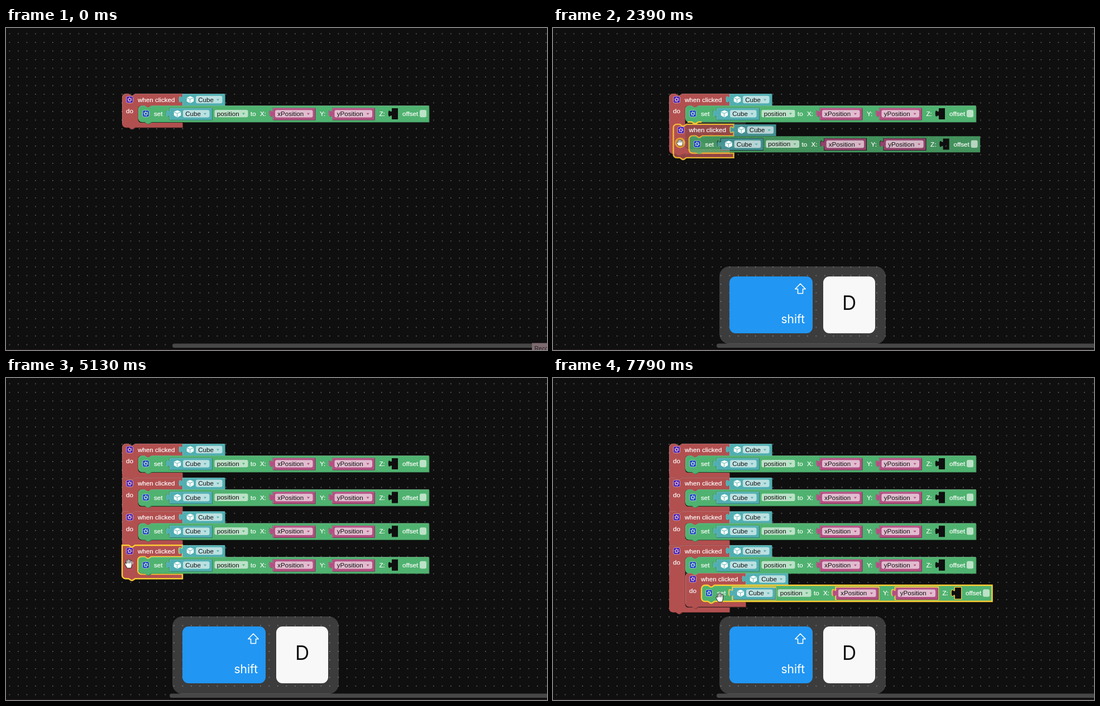
These frames come from a looping animation (969 px wide and 578 px high, 8 s). An HTML page:

```html
<!DOCTYPE html>
<html lang="en">
<head>
<meta charset="utf-8">
<title>Duplicating blocks</title>
<style>
  html, body { margin: 0; width: 100%; height: 100%; overflow: hidden; background: #0f0f0f; }
  svg { display: block; width: 969px; height: 578px; }
  text { font: 11.6px "Liberation Sans", Arial, sans-serif; fill: #fff; }
  .block text { stroke: #fff; stroke-width: .2; }
  .block .field text { fill: #111; stroke: none; }
  .shape { fill: var(--c); fill-rule: evenodd; }
  .shade { fill: color-mix(in srgb, var(--c), #000 32%); }
  .light { fill: none; stroke: color-mix(in srgb, var(--c), #fff 25%); stroke-width: .8; }
  .drag .shape { fill-opacity: .8; stroke-opacity: .85; }
  .drag .shade, .drag .light, .picked > .light { display: none; }
  .picked > .shape { stroke: #fc3; stroke-width: 2.4; }
  .icon { opacity: .62; }
  .hover .event > .icon { opacity: 1; }
  .key text { font-family: Inter, sans-serif; }
</style>
</head>
<body>
<svg id="stage" viewBox="0 0 969 578"></svg>
<script>
const LOOP = 8000;
const RED = '#b25050', GREEN = '#50b270', CYAN = '#50afb2', PINK = '#b25081';
const PITCH = 60.65, MOUTH = 51.7, HOME = [208, 118.3], NEST = [29, 50.4], COPY = [21.5, 43.6];

const NOTCH = 'l4.6,3.1 h2.4 l4.6,-3.1';
const NOTCH_BACK = 'l-4.6,3.1 h-2.4 l-4.6,-3.1';
const TAB = 'c0,7.75 -6.2,-6.2 -6.2,5.8 s6.2,-1.9 6.2,5.8';
const ROUND = 'V6 a6,6 0 0 1 6,-6';
const topEdge = square => `${square ? 'V0' : ROUND} H11.6 ${NOTCH}`;

// Event block outline: grow stretches the mouth, above/below square the joined corners.
function eventPath(grow = 0, above = false, below = false) {
  const inner = MOUTH + grow, end = PITCH - .7 + grow;
  return `M0,9 ${topEdge(above)} H108 v3.9 ${TAB} V20.7 H52 ${NOTCH_BACK} H34.2
    a6,6 0 0 0 -6,6 V${inner - 6} a6,6 0 0 0 6,6 H108 V${end} H23.2 ${NOTCH_BACK}
    ${below ? `H0 V${end}` : 'H6 a6,6 0 0 1 -6,-6'} Z`;
}
const valuePath = (x, y, w, h) => `M${x},${y} v3.9 ${TAB} V${y + h} H${x + w} V${y} Z`;
const bar = `M0,9 ${topEdge()} H520.5 V29 H23.2 ${NOTCH_BACK} H6 a6,6 0 0 1 -6,-6 Z`;
const emptySocket = valuePath(454, 4.2, 11, 20);
const sockets = [56, 241, 347.5].map(x => valuePath(x - .6, 3.4, 77, 22.2)).join(' ') + emptySocket;

const label = (x, y, s) => `<text x="${x}" y="${y}">${s}</text>`;
const faces = (outline, solid, light) =>
  `<path class="shade" transform="translate(.9 .9)" d="${solid}"/>
   <path class="shape" d="${outline}"/><path class="light" d="${light}"/>`;

const gear = (x, y) => `<g class="icon" transform="translate(${x} ${y})" fill="none" stroke="#fff">
  <rect x="-6" y="-6" width="12" height="12" rx="3" fill="#00f" stroke-width=".8"/>
  <circle r="2.4" stroke-width="1.3"/>
  <circle r="3.6" stroke-width="1.4" stroke-dasharray="1.6 2.17"/></g>`;

const pill = (x, y, w) =>
  `<rect x="${x}" y="${y}" width="${w}" height="13.4" rx="3" fill="#fff" fill-opacity=".62"/>`;
const field = (x, y, w, s, color) => `<g class="field">${pill(x, y, w)}${label(x + 4.2, y + 10.9, s)}
  <path d="M${x + w - 10.5},${y + 5.6} h5 l-2.5,3.2 Z" fill="${color}"/></g>`;

const value = (x, y, w, color, content) => `<g transform="translate(${x} ${y})" style="--c:${color}">
  ${faces(valuePath(0, 0, w, 21), valuePath(0, 0, w, 21), `M${w},.4 H.4 V3.9 ${TAB} V21`)}${content}</g>`;
const cube = (x, y) => value(x, y, 76, CYAN, `
  <path d="M14,4 L20.2,6.6 V13.4 L14,16.8 L7.8,13.4 V6.6 Z" fill="#fff"/>
  <path d="M8.2,7.2 L13.6,9.6 L19.8,7.2 M13.6,9.6 V16.2" fill="none" stroke="${CYAN}"/>
  ${field(24, 3.5, 47.5, 'Cube', CYAN)}`);
const variable = (x, name) => value(x, 4, 75.5, PINK, field(4, 3.5, 67.5, name, PINK));

const blockMarkup = `<g class="block">
  <g class="event" style="--c:${RED}">
    ${faces('', '', '')}${gear(13.5, 10.3)}${label(28, 14.4, 'when clicked')}${label(7, 35, 'do')}
  </g>
  ${cube(108, 0)}
  <g class="setter" transform="translate(29 21.4)" style="--c:${GREEN}">
    ${faces(bar + sockets, bar, `M.4,23 ${topEdge()} H520.5`)}
    <path class="shade" d="${emptySocket}" style="fill:#0f0f0f"/>
    ${gear(13.5, 14)}${label(28, 18.4, 'set')}${cube(56, 4)}
    ${field(136.5, 7.2, 60, 'position', GREEN)}${label(201, 18.4, 'to')}
    ${label(218, 18.4, 'X:')}${variable(241, 'xPosition')}
    ${label(325, 18.4, 'Y:')}${variable(347.5, 'yPosition')}
    ${label(431.5, 18.4, 'Z:')}${label(473, 18.4, 'offset')}${pill(504, 7.2, 12)}
  </g></g>`;

const stage = document.getElementById('stage');
stage.innerHTML = `
  <pattern id="dots" x="5.5" y="9.5" width="15.5" height="15.5" patternUnits="userSpaceOnUse">
    <rect width="1.6" height="1.6" fill="#686868"/></pattern>
  <rect width="969" height="578" fill="#0f0f0f"/>
  <rect width="969" height="578" fill="url(#dots)"/>
  <rect y="577" width="969" height="1" fill="#2b1a20"/>
  <rect id="scroll" y="566.5" width="700" height="7.5" rx="3.7" fill="#474747"/>
  <g id="marker"><path d="${eventPath(-14)}" fill="#888" fill-opacity=".25"/>
    <path d="M4,0 H11.6 ${NOTCH} h6" fill="none" stroke="#fc3" stroke-width="2.4"/></g>
  ${blockMarkup.repeat(5)}
  <g id="overlay">
    <rect id="panel" y="428" height="139" rx="18" fill="#fff" fill-opacity=".19"/>
    <g id="shift" class="key">
      <rect x="-74.5" y="-51" width="149" height="102" rx="11" fill="#2196f3"/>
      <path d="M52.5,-38 l9.2,9.5 h-4.7 v8 h-9 v-8 h-4.7 Z" fill="none" stroke="#fff" stroke-width="1.6" stroke-linejoin="round"/>
      <text x="60.5" y="33" text-anchor="end" style="font-size:21px">shift</text>
    </g>
    <g id="letter" class="key">
      <rect x="-46.5" y="-51" width="93" height="102" rx="11" fill="#f8f8f8"/>
      <text y="9" text-anchor="middle" style="font-size:35px;fill:#111">D</text>
    </g>
  </g>
  <g id="cursor">
    <circle id="press" r="9.5" fill="#fc2" fill-opacity=".6"/>
    <path id="arrow" d="M-4,-7 V6 L-1,3.2 L1,8 L3.2,7 L1.2,2.4 H5.4 Z" fill="#fff" stroke="#111" stroke-width=".8"/>
    <g id="hand" fill="#fff" stroke="#111" stroke-width=".9" stroke-linejoin="round">
      <path d="M-3,8 L-7,1 C-8,-1 -6,-2 -4.5,0 V-5 C-4.5,-7 -2.3,-7 -2.2,-5 V-6.5
        C-1.8,-8.5 .4,-8.5 .5,-6.5 V-6 C.7,-8 3,-7.7 3,-5.8 V-4 C3.3,-5.8 5.8,-5.5 5.6,-3 C5.5,2 5.5,4 4,8 Z"/>
      <path d="M-2.2,-5 V-.5 M.5,-6 V-.5 M3,-5 V-.5" fill="none"/>
    </g>
  </g>
  <g id="toast"><rect x="942" y="565.5" width="27" height="13" fill="#7d6b70"/>
    <text x="946.5" y="579" style="font-size:10.5px;fill:#241c20">Recor</text></g>`;

const $ = id => document.getElementById(id);
const add = (a, b, k = 1) => a.map((v, i) => v + b[i] * k);
const clamp = v => Math.min(1, Math.max(0, v));
const progress = (t, from, to) => clamp((t - from) / (to - from));
const smooth = p => p * p * (3 - 2 * p);
const mix = (a, b, p) => a.map((v, i) => v + (b[i] - v) * p);
const show = (node, on) => { node.style.display = on ? '' : 'none'; };
const place = (node, [x, y], scale = 1) =>
  node.setAttribute('transform', `translate(${x} ${y}) scale(${scale})`);

// The first block is there from the start; each later one is born, grabbed and dropped.
const ENTER = 260, ARRIVE = 1000, LEAVE = 6990, PICK = 7700;
const blocks = [
  { born: 0, grab: 0, drop: 0 },
  { born: 1600, grab: 1990, drop: 2660 },
  { born: 3050, grab: 3330, drop: 3620 },
  { born: 4160, grab: 4560, drop: 4940, viaGear: true },
  { born: 5420, grab: 5600, drop: 6280, nested: true, grip: [8, 24], bow: [10, 28] }
].map((b, i) => ({ grip: [12, 33], bow: [0, 0], ...b, home: add(HOME, [0, PITCH * i]) }));

document.querySelectorAll('.block').forEach((node, i) => {
  const b = blocks[i];
  Object.assign(b, { node, event: node.querySelector('.event'), setter: node.querySelector('.setter') });
  if (b.nested) b.home = add(blocks[i - 1].home, NEST);
  b.spawn = i ? add(blocks[i - 1].home, COPY) : b.home;
});

function positionOf(b, t) {
  if (t >= b.drop) return b.home;
  const p = progress(t, b.grab, b.drop);
  return add(mix(b.spawn, b.home, smooth(p)), b.bow, Math.sin(Math.PI * p));
}

const stops = [{ t: ENTER, at: [838, 528] }, { t: ARRIVE, at: add(HOME, [12, 39]) }];
for (const b of blocks.slice(1)) {
  stops.push({ t: b.born, at: stops.at(-1).at });
  if (b.viaGear) stops.push({ t: b.born + 160, at: add(b.spawn, [20, 22]) });
  stops.push({ t: b.grab - 40, at: add(b.spawn, b.grip) }, { t: b.drop, at: add(b.home, b.grip) });
}
stops.push({ t: LEAVE, at: stops.at(-1).at }, { t: PICK, at: [299, 394] });

function pointerAt(t) {
  const i = stops.findIndex(s => s.t > t);
  if (i <= 0) return stops.at(i).at;
  const a = stops[i - 1], b = stops[i];
  return mix(a.at, b.at, smooth(progress(t, a.t, b.t)));
}

function reshape(b, grow, above, below) {
  const key = [grow, above, below].join();
  if (b.key === key) return;
  b.key = key;
  const [shade, shape, light] = b.event.querySelectorAll(':scope > path');
  shade.setAttribute('d', eventPath(grow, above, below));
  shape.setAttribute('d', eventPath(grow, above, below));
  light.setAttribute('d', `M.4,54 ${topEdge(above)} H108`);
}

const pop = (t, start) => {
  const p = progress(t, start, start + 90);
  return t < start ? 1 : .7 + .3 * p * (2 - p);
};

// Every new copy makes both keys pop again, shift first.
function drawKeys(t, latest) {
  const shiftAt = latest.born + 120, letterAt = shiftAt + 100;
  const scale = pop(t, shiftAt), inset = 20 * (1 - scale);
  $('overlay').style.opacity = latest === blocks[0] ? 0 : progress(t, blocks[1].born, blocks[1].born + 90);
  $('panel').setAttribute('x', 298 + inset);
  $('panel').setAttribute('width', 298 - 2 * inset);
  place($('shift'), [390.5 + inset, 497], scale);
  show($('letter'), t >= letterAt);
  place($('letter'), [530.5, 497], pop(t, letterAt));
}

function draw(t) {
  const latest = blocks.filter(b => b.born <= t).at(-1);
  const held = blocks.find(b => t >= b.grab && t < b.drop);
  const parent = held && blocks[blocks.indexOf(held) - 1];
  const dragged = held ? progress(t, held.grab, held.drop) : 0;
  const pointer = held ? add(positionOf(held, t), held.grip) : pointerAt(t);
  const landing = dragged > .75, inMouth = held && (held.nested ? landing : dragged > .4 && !landing);
  const [dx, dy] = add(add(pointer, [-4, -7]), positionOf(latest, t), -1);
  const onGear = !held && Math.hypot(dx - 13.5, dy - 10.3) < 9;

  blocks.forEach((b, i) => {
    const next = blocks[i + 1], joined = next && t >= next.drop;
    const grow = joined && next.nested ? 60 : inMouth && b === parent ? 47 : 0;
    reshape(b, grow, i > 0 && !b.nested && t >= b.drop, Boolean(joined && !next.nested));
    show(b.node, t >= b.born);
    place(b.node, positionOf(b, t));
    b.node.classList.toggle('drag', b === held);
    b.node.classList.toggle('hover', b === latest && onGear);
    b.event.classList.toggle('picked', b === latest && t >= ARRIVE && t < PICK);
    b.setter.classList.toggle('picked', b === latest && t >= PICK);
  });

  show($('marker'), inMouth || landing);
  if (held) {
    held.node.before($('marker'));
    place($('marker'), inMouth ? add(parent.home, NEST) : held.home);
  }

  const arrow = t < ARRIVE || onGear;
  show($('cursor'), t >= ENTER);
  place($('cursor'), pointer);
  show($('arrow'), arrow);
  show($('hand'), !arrow);
  $('hand').setAttribute('transform', held ? 'scale(.9 .72)' : '');
  show($('press'), held || (t >= ARRIVE && t < ARRIVE + 70));

  $('scroll').setAttribute('x', latest === blocks[0] ? 298 : held && held.nested ? 287 : 293);
  show($('toast'), t < 70);
  drawKeys(t, latest);
}

const begin = performance.now();
function tick() {
  draw((performance.now() - begin) % LOOP);
  requestAnimationFrame(tick);
}
tick();
</script>
</body>
</html>
```
